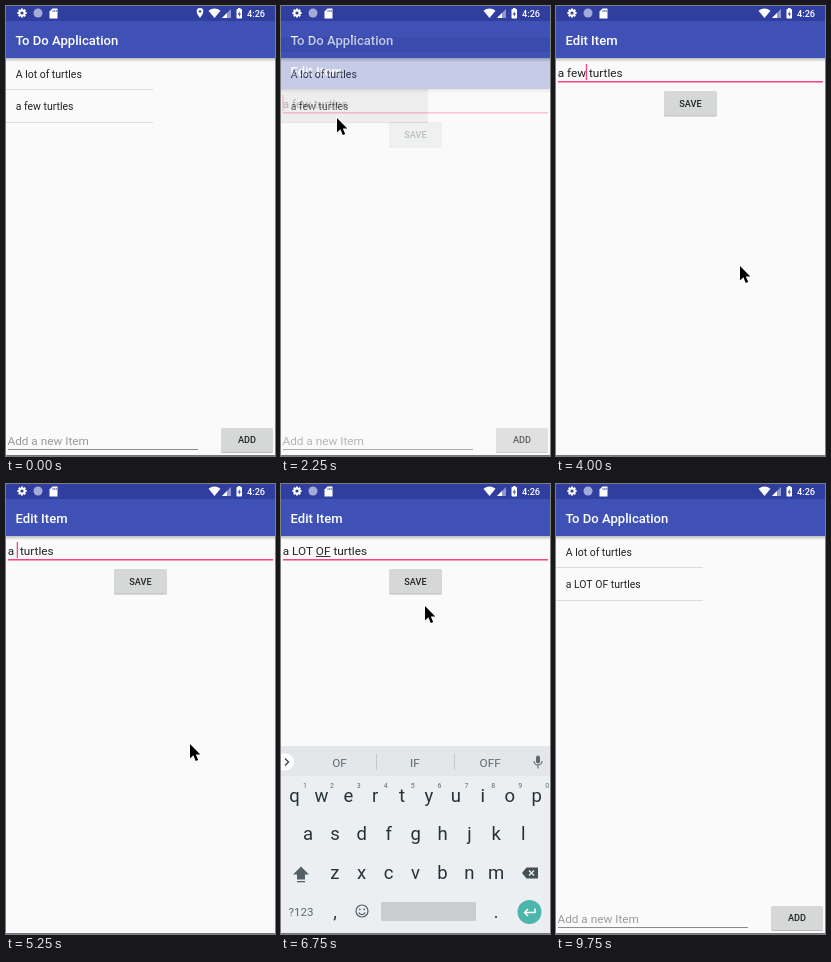
Recreate the animation shown at these times as an HTML page with a canvas. Size 269 by 450 pixels, loop 10000 ms.

```html
<!DOCTYPE html>
<html lang="en">
<head>
<meta charset="utf-8">
<title>To do list</title>
<style>
  html, body { margin: 0; width: 100%; height: 100%; overflow: hidden; background: #fafafa; }
  canvas { display: block; width: 269px; height: 450px; }
</style>
</head>
<body>
<canvas></canvas>
<script>
const W = 269, H = 450, LOOP = 10000, STEP = 250;
const dpr = window.devicePixelRatio || 1;
const screen2d = setUp(document.querySelector('canvas'));
const layer2d = setUp(document.createElement('canvas'));
let c = screen2d; // context that the helpers draw on

function setUp(canvas) {
  canvas.width = W * dpr;
  canvas.height = H * dpr;
  const context = canvas.getContext('2d');
  context.scale(dpr, dpr);
  return context;
}

// ---- timeline: [start time, value] ----
const pointer = [[0, null], [500, [163, 173]], [750, [119, 140]], [1000, [74, 109]], [1500, [53, 108]],
  [2000, [56, 112]], [2750, [140, 205]], [3000, [184, 260]], [6500, [160, 180]], [6750, [144, 122]],
  [7250, [140, 122]], [7750, [147, 172]], [8000, [152, 234]], [8250, [137, 292]], [8500, [141, 349]], [9000, null]];
// "|" marks the caret, "_" encloses the word being composed
const entry = [[0, '|a few turtles'], [3000, 'a |few turtles'], [3500, 'a f|ew turtles'], [3750, 'a fe|w turtles'],
  [4000, 'a few| turtles'], [4250, 'a few |turtles'], [4500, 'a few| turtles'], [5000, 'a f| turtles'],
  [5250, 'a | turtles'], [5750, 'a _LO_| turtles'], [6000, 'a _LOT_| turtles'], [6250, 'a LOT _O_| turtles'],
  [6500, 'a LOT _OF_| turtles'], [6750, 'a LOT _OF_ turtles']];
const suggestions = [[0, null], [5750, 'LO LOT LONG'], [6000, 'LOT LOTS LOTTO'], [6250, 'O OF ON'],
  [6500, 'OF IF OFF'], [7250, null]];
const editView = [[0, [0, 0]], [2250, [0.28, 31]], [2500, [1, 0]], [7250, [0.4, 18]], [7500, [0, 0]]]; // opacity, offset
const toastOpacity = [[0, 0], [7500, 0.7], [7750, 1], [9250, 0.65], [9500, 0.25], [9750, 0]];

const at = (track, t) => track.filter(([start]) => start <= t).pop()[1];

// ---- drawing helpers ----
function rect(x, y, w, h, fill, radius = 0) {
  c.fillStyle = fill;
  c.beginPath();
  c.roundRect(x, y, w, h, radius);
  c.fill();
}

function text(str, x, y, size, fill, align = 'left', weight = 400) {
  c.font = `${weight} ${size}px Roboto, sans-serif`;
  c.textAlign = align;
  c.fillStyle = fill;
  c.fillText(str, x, y);
}

function disc(x, y, r, fill) {
  c.fillStyle = fill;
  c.beginPath();
  c.arc(x, y, r, 0, 7);
  c.fill();
}

function shape(d, fill, x = 0, y = 0) {
  c.save();
  c.translate(x, y);
  c.fillStyle = fill;
  c.fill(new Path2D(d));
  c.restore();
}

function stroke(d, color, width = 1, x = 0, y = 0) {
  c.save();
  c.translate(x, y);
  c.strokeStyle = color;
  c.lineWidth = width;
  c.stroke(new Path2D(d));
  c.restore();
}

function button(x, y, w, h, label, pressed) {
  rect(x, y + 1, w, h, '#bbb', 1.5);
  rect(x, y, w, h, pressed ? '#c6c7c7' : '#d6d7d7', 1.5);
  text(label, x + w / 2, y + h / 2 + 3.3, 9.16, '#222', 'center', 500);
}

// ---- screens ----
function page(title) {
  rect(0, 0, W, H, '#fafafa');
  const shadow = c.createLinearGradient(0, 52, 0, 56);
  shadow.addColorStop(0, 'rgba(0,0,0,.25)');
  shadow.addColorStop(1, 'rgba(0,0,0,0)');
  rect(0, 52, W, 4, shadow);
  rect(0, 0, W, 15, '#303f9f');
  rect(0, 15, W, 37, '#3f51b5');
  text(title, 9.5, 38.5, 13.09, '#fff', 'left', 500);
}

function listPage(second, pressed) {
  page('To Do Application');
  if (pressed) rect(0, 84, 147, 32, 'rgba(0,0,0,.07)');
  ['A lot of turtles', second].forEach((item, i) => {
    text(item, 9.7, 71.7 + 32.5 * i, 10.47, '#212121');
    rect(0, 83 + 33 * i, 147, 1, '#dcdcdc');
  });
  text('Add a new Item', 1.5, 439, 11.78, '#9a9a9a');
  rect(2, 443, 190, 1, '#8c8c8c');
  button(215, 422, 52, 24, 'ADD');
}

function editPage(value, pressed) {
  page('Edit Item');
  const size = 11.78, left = 1.7;
  const plain = value.replace(/[_|]/g, '');
  text(plain, left, 71, size, '#212121');
  const xOf = mark => left + c.measureText(value.slice(0, value.indexOf(mark)).replace(/_/g, '')).width;
  const word = value.match(/_(.+)_/);
  if (word) rect(xOf('_'), 72, c.measureText(word[1]).width, 1, '#333');
  if (value.includes('|')) rect(xOf('|') - 0.3, 58, 1.3, 16, '#ff4081');
  rect(2, 75, 265, 1.5, '#ff4081');
  button(108, 85, 53, 24.5, 'SAVE', pressed);
}

function keyboard(words) {
  const ink = '#263238', soft = '#5c6a71', pitch = 26.9;
  rect(0, 262, W, H - 262, '#eceff1');
  rect(0, 262, W, 30, '#e4e7e9');
  rect(-10, 269.5, 23, 17, '#fff', 8.5);
  stroke('M4 274.5L7.5 278L4 281.5', '#37474f', 1.4);
  words.split(' ').forEach((w, i) => text(w, 58.5 + 75.3 * i, 282.5, 11.8, soft, 'center'));
  rect(95, 270, 1, 16, '#c4c9cc');
  rect(173, 270, 1, 16, '#c4c9cc');
  rect(255, 271.5, 4, 8, soft, 2);
  stroke('M253 277a4 4 0 0 0 8 0M257 281v3.5', soft, 1.1);

  const row = (letters, x, y) =>
    [...letters].forEach((k, i) => text(k, x + pitch * i, y, 18.5, ink, 'center'));
  row('qwertyuiop', 13.5, 318);
  row('asdfghjkl', 27, 356);
  row('zxcvbnm', 53.8, 395);
  [...'1234567890'].forEach((n, i) => text(n, 24 + pitch * i, 304, 7, soft, 'center'));

  shape('M0 -7L8 1H4V6H-4V1H-8Z', '#546067', 20, 389.5);
  rect(16, 397, 8, 1.3, '#546067');
  shape('M-8 0L-3.5 -5.5H8V5.5H-3.5Z', '#455157', 249, 389);
  stroke('M-1 -2.5L4 2.5M4 -2.5L-1 2.5', '#eceff1', 1.3, 249, 389);

  text('?123', 20, 431.5, 11.5, soft, 'center');
  text(',', 54, 434, 18, ink, 'center');
  text('.', 215, 434, 18, ink, 'center');
  stroke('M6 0a6 6 0 1 0 -12 0a6 6 0 1 0 12 0M-3.2 1.5a3.5 3.5 0 0 0 6.4 0', '#546067', 1.2, 81, 427);
  disc(78.8, 425.3, 0.9, '#546067');
  disc(83.2, 425.3, 0.9, '#546067');
  rect(100, 418, 95, 19, '#cacdd0', 1.5);
  disc(248.5, 428, 12, '#4db6ac');
  stroke('M5.5 -3.5V0.5H-5M-1.5 -3L-5 0.5L-1.5 4', '#fff', 1.5, 248.5, 428);
}

function statusIcons(located) {
  const white = '#fff', dim = '#8f99d0';
  for (let i = 0; i < 4; i++) {
    const a = i * Math.PI / 4, x = 4.6 * Math.cos(a), y = 4.6 * Math.sin(a);
    stroke(`M${x} ${y}L${-x} ${-y}`, white, 2, 16, 7);
  }
  disc(16, 7, 3.6, white);
  disc(16, 7, 1.6, '#303f9f');
  disc(32, 7, 4.5, '#a3acd9');
  shape('M3 0H8V10H0V3Z', white, 43.5, 2.5);
  stroke('M47 4v2M48.7 4v2M50.3 4v2', '#303f9f', 0.7);
  if (located) {
    shape('M0 5C-2 2 -3.3 0.5 -3.3 -1.6A3.3 3.3 0 0 1 3.3 -1.6C3.3 0.5 2 2 0 5Z', white, 194, 7);
    disc(194, 5.4, 1.2, '#303f9f');
  }
  shape('M0 9L-6 1.8Q0 -2.6 6 1.8Z', white, 208.5, 3);
  shape('M9 0V9H0Z', dim, 216, 3);
  shape('M5 4V9H0Z', white, 216, 3);
  rect(230.5, 3, 5.5, 9.5, white, 0.8);
  rect(232, 2, 2.5, 1.5, white);
  shape('M0.6 -3L-1.5 0.6H0V3L1.7 -0.6H0.3Z', '#303f9f', 233.2, 8);
  text('4:26', 241, 10.6, 9.16, white, 'left', 500);
}

function toast(opacity) {
  c.globalAlpha = opacity;
  rect(92, 402, 85, 31, '#ebebeb', 15.5);
  text('Item updated', 134.5, 421, 9.16, '#565656', 'center');
  c.globalAlpha = 1;
}

function arrow([x, y]) {
  const d = 'M0 0V14.5L3.4 11.3L5.7 17L8.2 16L5.8 10.5H10.3Z';
  stroke(d, '#fff', 1.6, x, y);
  shape(d, '#000', x, y);
}

function draw(t) {
  c = screen2d;
  const [opacity, offset] = at(editView, t);
  if (opacity < 1) listPage(t < 5000 ? 'a few turtles' : 'a LOT OF turtles', t >= 2000 && t < 2500);
  if (opacity > 0) {
    c = layer2d;
    editPage(at(entry, t), t === 7000);
    c = screen2d;
    c.globalAlpha = opacity;
    c.drawImage(layer2d.canvas, 0, offset, W, H);
    c.globalAlpha = 1;
  }
  const words = at(suggestions, t);
  if (words) keyboard(words);
  statusIcons(t < 1500);
  toast(at(toastOpacity, t));
  rect(0, 449, W, 1, '#777');
  const tip = at(pointer, t);
  if (tip) arrow(tip);
}

const origin = performance.now();
function tick() {
  const t = (performance.now() - origin) % LOOP;
  draw(Math.floor(t / STEP) * STEP);
  requestAnimationFrame(tick);
}
tick();
</script>
</body>
</html>
```
